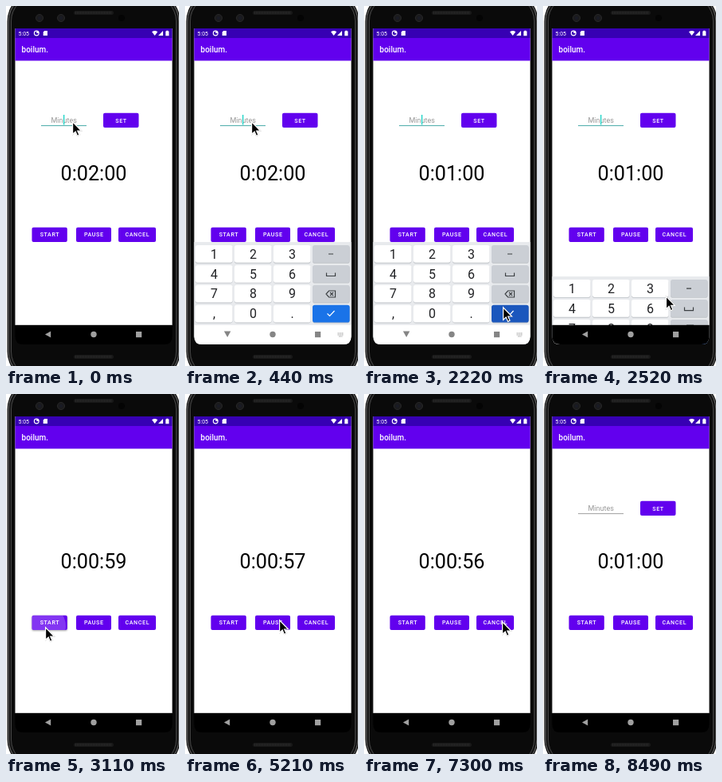
Write an HTML page that moves like this. It is 217 px wide and 450 px high and loops after 8.64 s.

```html
<!DOCTYPE html>
<html lang="en">
<head>
<meta charset="utf-8">
<title>Kitchen timer</title>
<style>
  html, body { margin: 0; width: 100%; height: 100%; overflow: hidden; background: #fff; }
  svg { display: block; width: 100vw; height: 100vh; }
  text { font-family: Roboto, "Open Sans", sans-serif; text-anchor: middle; }
  .left { text-anchor: start; fill: #fff; }
  .btn text { font-size: 7.1px; font-weight: 500; letter-spacing: .63px; fill: #fff; }
  .btn rect { fill: #6200ee; }
  .keys text { font-size: 16px; fill: #202124; }
  #arrow { filter: drop-shadow(0 .8px .7px rgba(0, 0, 0, .4)); }
</style>
</head>
<body>
<svg viewBox="0 0 217 450" preserveAspectRatio="none">
  <defs>
    <clipPath id="screenClip"><path d="M11.5 28H208.5V413Q208.5 423 198.5 423H21.5Q11.5 423 11.5 413Z"/></clipPath>
    <clipPath id="appClip"><rect x="11" y="68" width="198" height="331"/></clipPath>
  </defs>

  <!-- phone body -->
  <rect x="1.5" y="-17" width="217" height="485" rx="36" fill="#141414"/>
  <g fill="none">
    <rect x="3.2" y="-15.3" width="213.6" height="481.6" rx="34.3" stroke="#6c6c6c"/>
    <rect x="6.5" y="-12" width="207" height="475" rx="31" fill="#0a0a0a" stroke="#484848"/>
  </g>
  <g fill="#1b1b1d" stroke="#2b2b2d" stroke-width=".8">
    <circle cx="42" cy="15" r="4.6"/><circle cx="69" cy="15" r="4.6"/>
  </g>
  <g fill="#191b25"><circle cx="42" cy="15" r="2"/><circle cx="69" cy="15" r="2"/></g>
  <circle cx="145" cy="15" r="4" fill="#040404"/>
  <g fill="#191919"><rect x="85" y="6" width="50" height="5" rx="2.5"/><rect x="85" y="436" width="50" height="5" rx="2.5"/></g>
  <path d="M87 8.5H133M87 438.5H133" stroke="#292929" stroke-width="3" stroke-dasharray="1 1"/>

  <g clip-path="url(#screenClip)">
    <rect x="11" y="28" width="198" height="371" fill="#fff"/>
    <rect x="11" y="28" width="198" height="12" fill="#3700b3"/>
    <rect x="11" y="40" width="198" height="28.4" fill="#6200ee"/>
    <text class="left" x="15.5" y="37" font-size="7">5:05</text>
    <g fill="#fff">
      <circle cx="38.3" cy="34" r="2.9" fill="none" stroke="#fff" stroke-width="1.1"/>
      <path d="M38.3 34V31A3 3 0 0 1 41.3 34Z"/>
      <path d="M48.3 31H52V37H46.7V32.6Z"/>
      <path d="M183 32.2Q186.6 29.6 190.2 32.2L186.6 37Z"/>
      <path d="M197 31V37H191Z"/>
      <path d="M201.2 30.8H203.4V31.5H204.4V37.2H200.2V31.5H201.2Z"/>
    </g>
    <text class="left" x="19.5" y="58" font-size="10" font-weight="500">boilum.</text>

    <g id="form">
      <text id="entry" x="72.7" y="146" font-size="9"></text>
      <path id="line" d="M44 149.6H101" stroke-width="1"/>
      <path id="caret" d="M72.7 136V148.5" stroke="#03cfc0" stroke-width="1.2"/>
    </g>
    <text id="clock" x="110" y="218.4" font-size="25.2" fill="#000"></text>
    <g id="buttons" clip-path="url(#appClip)"></g>

    <g id="board" class="keys"><rect x="11" y="295" width="198" height="130" fill="#e8eaed"/></g>
    <rect id="nav" x="11" y="398.8" width="198" height="25"/>
    <g id="navIcons">
      <path id="back"/>
      <circle cx="110" cy="410.5" r="3.7"/>
      <rect x="163" y="407" width="7.2" height="7.2"/>
    </g>
    <path id="kbIcon" d="M191.5 409H199M191.5 411H199M193 413H197.5" stroke="#999" stroke-width="1.1" stroke-dasharray="1.2 .6"/>
  </g>

  <path id="arrow" d="M.6 .8V16.3L4.2 13L6.5 18.4L9 17.3L6.7 12H11.5Z" fill="#000" stroke="#fff" stroke-width="1.2"/>
</svg>
<script>
const LOOP = 8640;
const $ = id => document.getElementById(id);
const show = (el, on) => el.style.display = on ? '' : 'none';
const clamp = v => Math.max(0, Math.min(1, v));

function add(parent, tag, attrs, text) {
  const el = document.createElementNS('http://www.w3.org/2000/svg', tag);
  for (const k in attrs) el.setAttribute(k, attrs[k]);
  if (text) el.textContent = text;
  return parent.appendChild(el);
}

// Buttons, each with the moment and point of its press
const buttons = [
  ['SET', 122, 133.8, 44.5, 1180, 145, 142],
  ['START', 32.5, 276.7, 44.3, 3110, 49, 290],
  ['PAUSE', 88, 276.7, 44, 6710, 118, 284],
  ['CANCEL', 141, 276.7, 47, 7900, 173, 285]
].map(([label, x, y, w, at, cx, cy]) => {
  const g = add(label === 'SET' ? $('form') : $('buttons'), 'g', { class: 'btn' });
  const box = { x, y, width: w, height: 18.2, rx: 2 };
  add(add(g, 'clipPath', { id: 'c' + label }), 'rect', box);
  const face = add(g, 'rect', box);
  const wave = add(g, 'circle', { cx, cy, fill: '#fff', 'clip-path': `url(#c${label})` });
  add(g, 'text', { x: x + w / 2 + .3, y: y + 11.7 }, label);
  return { face, wave, at };
});

// Number keyboard
const board = $('board');
const columns = [13, 62, 111, 160];
const labels = ['123', '456', '789', ',0.'];
let enter;
labels.forEach((row, r) => columns.forEach((x, c) => {
  const y = 299 + r * 24.9;
  add(board, 'rect', { x, y: y + .9, width: 46.6, height: 21.8, rx: 2.8, fill: '#bfc3c8' });
  const fill = c < 3 ? '#fff' : r < 3 ? '#cbcfd5' : '#1a73e8';
  const key = add(board, 'rect', { x, y, width: 46.6, height: 21.8, rx: 2.8, fill });
  if (c < 3) add(board, 'text', { x: x + 23.5, y: y + 16.6 }, row[c]);
  else enter = key;
}));
const glyph = (d, stroke) => add(board, 'path', { d, stroke, fill: 'none', 'stroke-width': 1.2 });
glyph('M180 310H186M177.5 333.5V337.5H188.5V333.5', '#3c4043');
glyph('M180.5 356H188.5V364H180.5L177 360ZM182 358L186 362M186 358L182 362', '#3c4043');
glyph('M178.5 384.5L181.5 387.5L187.5 381', '#fff');

// The picture only changes at these moments
const runs = [[150, 880, 6], [1180, 2220, 8], [2370, 3410, 8], [6710, 7300, 5], [7900, 8490, 5]];
const ticks = [0, 3560, 4160, 5210, 6110];
for (const [a, b, n] of runs)
  for (let i = 0; i < n; i++) ticks.push(Math.round((a + (b - a) * i / (n - 1)) / 10) * 10);
ticks.sort((a, b) => a - b);
const snap = t => ticks.filter(v => v <= t).pop();

// Pointer path: time, x, y
const path = [
  [0, 83, 144], [590, 83, 144], [880, 145, 142], [1330, 145, 142], [2070, 174, 376],
  [2370, 174, 376], [2960, 49, 291], [3110, 49, 291], [3260, 64, 288], [3410, 98, 283], [3560, 118, 282],
  [6710, 118, 282], [7300, 173, 284], [8050, 173, 284], [8350, 154, 436], [8490, 150, 470]
];
function pointer(t) {
  const i = Math.max(1, path.findIndex(p => p[0] >= t));
  const [a, b] = [path[i - 1], path[i]];
  const u = clamp((t - a[0]) / (b[0] - a[0]));
  const e = u * u * (3 - 2 * u);
  return [a[1] + (b[1] - a[1]) * e, a[2] + (b[2] - a[2]) * e];
}

function seconds(t) {
  if (t < 1180) return 120;
  if (t < 3110 || t >= 8050) return 60;
  return 59 - [4160, 5210, 6110].filter(v => t >= v).length;
}

function draw(t) {
  const s = seconds(t);
  $('clock').textContent = `0:0${Math.floor(s / 60)}:${String(s % 60).padStart(2, '0')}`;

  const focus = t < 3110;
  const typed = t >= 590 && t < 1180;
  show($('form'), focus || t >= 8050);
  show($('caret'), focus);
  $('caret').setAttribute('transform', `translate(${typed ? 2.8 : 0} 0)`);
  $('entry').textContent = typed ? '1' : 'Minutes';
  $('entry').setAttribute('fill', typed ? '#222' : '#999');
  $('line').setAttribute('stroke', focus ? '#48aaa8' : '#a0a0a0');

  for (const b of buttons) {
    const age = t - b.at, on = age >= 0 && age < 420;
    show(b.wave, on);
    b.wave.setAttribute('r', 26 + Math.max(0, age) * .1);
    b.wave.setAttribute('opacity', .21 * clamp(1 - age / 420));
    b.face.style.filter = on && age < 200 ? 'drop-shadow(0 1.5px 1px rgba(0,0,0,.35))' : '';
  }

  const rise = clamp((t - 80) / 340), fall = clamp((t - 2300) / 340);
  const shift = 103 * ((1 - rise) ** 2 + fall ** 2);
  const light = t >= 150 && t < 2510;
  show(board, t >= 150 && t < 2640);
  board.setAttribute('transform', `translate(0 ${shift})`);
  enter.setAttribute('fill', t >= 2220 ? '#1b57bd' : '#1a73e8');
  $('nav').setAttribute('fill', light ? '#fff' : '#000');
  $('navIcons').setAttribute('fill', light ? '#858585' : '#a0a0a0');
  $('back').setAttribute('d', light ? 'M49 406.5H57.4L53.2 414Z' : 'M56.2 406.5V414.5L49 410.5Z');
  show($('kbIcon'), light);

  show($('arrow'), t < 8490);
  $('arrow').setAttribute('transform', `translate(${pointer(t).join(' ')})`);
}

const start = performance.now();
let last = -1;
function tick() {
  const t = snap((performance.now() - start) % LOOP);
  if (t !== last) draw(last = t);
  requestAnimationFrame(tick);
}
tick();
</script>
</body>
</html>
```
